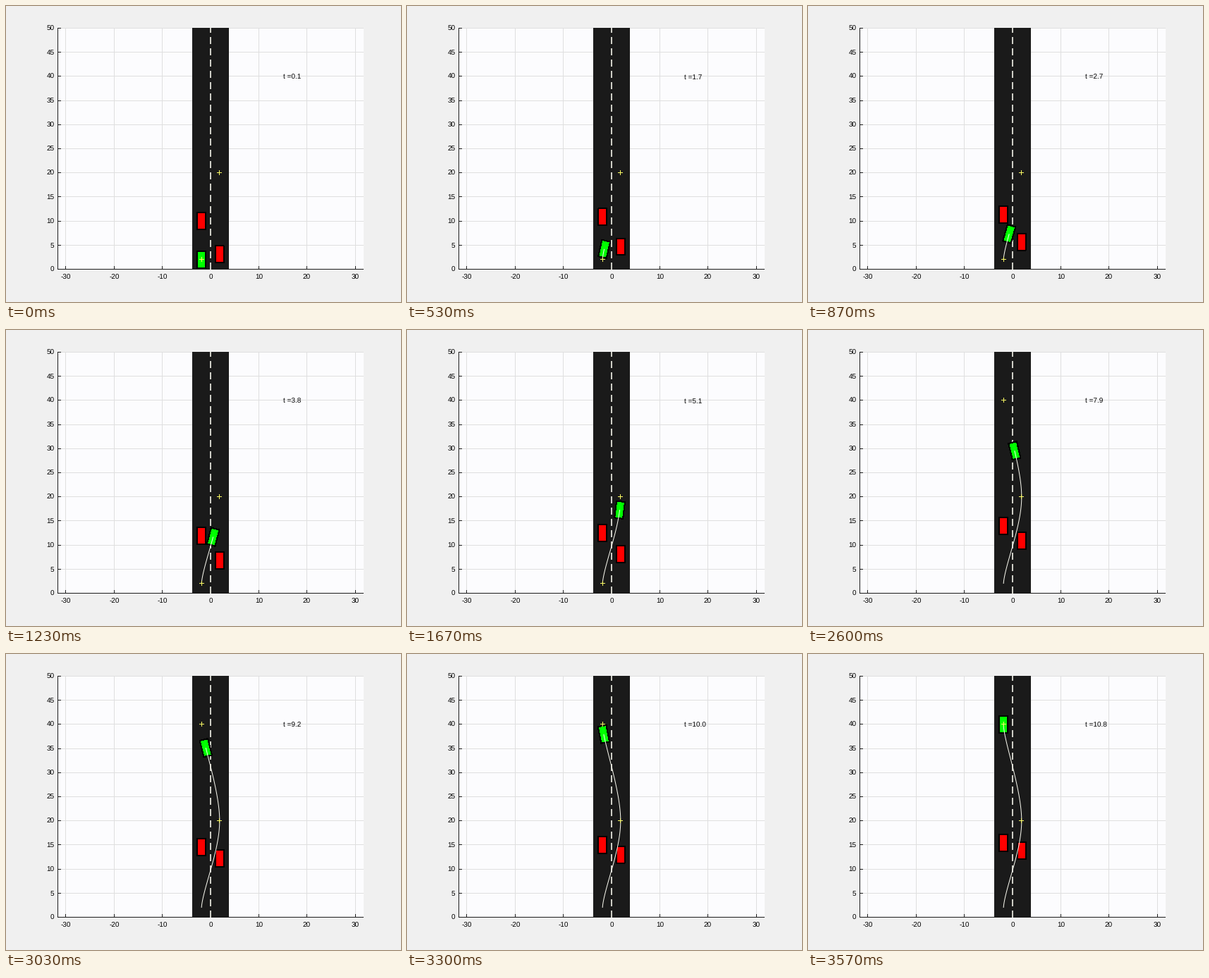
Recreate the animation shown at these times as a matplotlib script. Size 560x420 px, loop 3610 ms.

```python
import numpy as np
import matplotlib.pyplot as plt
from matplotlib.animation import FuncAnimation
from matplotlib.patches import Polygon, Rectangle

plt.rcParams["path.snap"] = False
plt.rcParams["text.hinting"] = "none"
plt.rcParams["font.family"] = "Liberation Sans"

W, H = 560, 420
PT = 0.72                    # points per pixel at 100 dpi
SCALE = 6.846                # pixels per metre
LEFT, RIGHT, TOP, BOTTOM = 73, 507, 31, 374

PAPER, PLOT, ROAD = "#f0f0f0", "#fcfcfe", "#1a1a1a"
GRID, INK, LINE, MARK = "#dfdfdf", "#1c1c1c", "#fafaf0", "#fafa64"
LANE = 1.875
STEPS = 108
T_START, T_SWITCH, T_END = 0.1, 5.75, 10.8


def px(x):
    return 290 + SCALE * np.asarray(x, float)


def py(y):
    return 373.67 - SCALE * np.asarray(y, float)


def mid(v):
    """Centre of the pixel that holds v."""
    return np.floor(v) + 0.5


def hermite(s, a, b, va, vb):
    """Cubic from a to b with end slopes va and vb, for s in 0..1."""
    return (a + (b - a) * (3 * s**2 - 2 * s**3)
            + va * (s**3 - 2 * s**2 + s) + vb * (s**3 - s**2))


def position(t):
    """Place of the overtaking car at time t."""
    if t < T_SWITCH:
        span = T_SWITCH - T_START
        s = max(0, (t - T_START) / span)
        w = 1 - s
        x = -LANE + 2 * LANE * s**3 * (1 + 3 * w + 2.1 * w**2)
        return x, hermite(s, 2, 20, 0, 4 * span)
    span = T_END - T_SWITCH
    s = min(1, (t - T_SWITCH) / span)
    return hermite(s, LANE, -LANE, 0, 0), hermite(s, 20, 40, 4 * span, 2 * span)


def heading(t, eps=1e-3):
    x0, y0 = position(t - eps)
    x1, y1 = position(t + eps)
    return np.arctan2(x1 - x0, y1 - y0)


def car_corners(x, y, angle=0.0, width=1.75, length=3.5):
    u = np.array([-1, 1, 1, -1]) * width / 2
    v = np.array([-1, -1, 1, 1]) * length / 2
    c, s = np.cos(angle), np.sin(angle)
    return np.column_stack([px(x + u * c + v * s), py(y - u * s + v * c)])


fig = plt.figure(figsize=(5.6, 4.2), dpi=100, facecolor=PAPER)
ax = fig.add_axes([0, 0, 1, 1])
ax.set_xlim(0, W)
ax.set_ylim(H, 0)
ax.axis("off")


def stroke(xs, ys, color, width=1.0, z=1):
    line, = ax.plot(xs, ys, color=color, lw=width * PT, zorder=z,
                    solid_capstyle="butt")
    return line


def label(x, y, text, ha):
    return ax.text(x, y, text, ha=ha, va="baseline", color="black",
                   fontsize=10 * PT, zorder=8)


def make_car(color, z):
    return ax.add_patch(Polygon(car_corners(0, 0), facecolor=color,
                                edgecolor="black", lw=PT, zorder=z,
                                antialiased=False))


def make_plus():
    return stroke([], [], MARK, z=7), stroke([], [], MARK, z=7)


def place_plus(plus, x, y):
    cx, cy = mid(px(x)), mid(py(y))
    plus[0].set_data([cx - 3.5, cx + 3.5], [cy, cy])
    plus[1].set_data([cx, cx], [cy - 3.5, cy + 3.5])


# Plot area, grid, ticks and labels
ax.add_patch(Rectangle((LEFT, TOP), RIGHT - LEFT, BOTTOM - TOP,
                       facecolor=PLOT, lw=0, zorder=0))
for v in range(-30, 31, 10):
    gx = mid(px(v))
    stroke([gx, gx], [TOP, BOTTOM], GRID)
    stroke([gx, gx], [BOTTOM - 5, BOTTOM], INK, z=3)
    label(gx, 388, str(v), "center")
for v in range(0, 51, 5):
    gy = mid(py(v))
    stroke([LEFT, RIGHT], [gy, gy], GRID)
    stroke([LEFT, LEFT + 5], [gy, gy], INK, z=3)
    label(68.5, gy + 3.5, str(v), "right")
stroke([LEFT + 0.5] * 2, [TOP, BOTTOM], INK, z=3)
stroke([LEFT, RIGHT], [BOTTOM - 0.5] * 2, INK, z=3)

# Road with its dashed centre line
ax.add_patch(Rectangle((264, TOP), 52, BOTTOM - TOP, facecolor=ROAD,
                       lw=0, zorder=2))
for y in range(BOTTOM, TOP, -16):
    stroke([290, 290], [y, max(y - 10, TOP)], LINE, 1.6, z=3)

slow_car = make_car("#ff0000", 4)
side_car = make_car("#ff0000", 4)
hero_car = make_car("#00ff00", 5)
trail = stroke([], [], LINE, z=6)
start_mark, goal_mark = make_plus(), make_plus()
clock = label(px(15), 104, "", "left")

times = (np.arange(STEPS) + 1) / 10
track = np.array([position(t) for t in times])


def update(frame):
    step = min(int(0.3 * frame + 0.15), STEPS - 1)
    t = times[step]
    slow_car.set_xy(car_corners(-LANE, 10 + 0.5 * t))
    side_car.set_xy(car_corners(LANE, 3 + t))
    hero_car.set_xy(car_corners(*track[step], heading(t)))
    trail.set_data(px(track[:step + 1, 0]), py(track[:step + 1, 1]))
    if t < T_SWITCH:
        ends = (-LANE, 2), (LANE, 20)
    else:
        ends = (LANE, 20), (-LANE, 40)
    place_plus(start_mark, *ends[0])
    place_plus(goal_mark, *ends[1])
    clock.set_text(f"t ={t:.1f}")
    return (slow_car, side_car, hero_car, trail,
            *start_mark, *goal_mark, clock)


anim = FuncAnimation(fig, update, frames=361, interval=10,
                     repeat=True, repeat_delay=0, blit=False)
plt.show()
```
